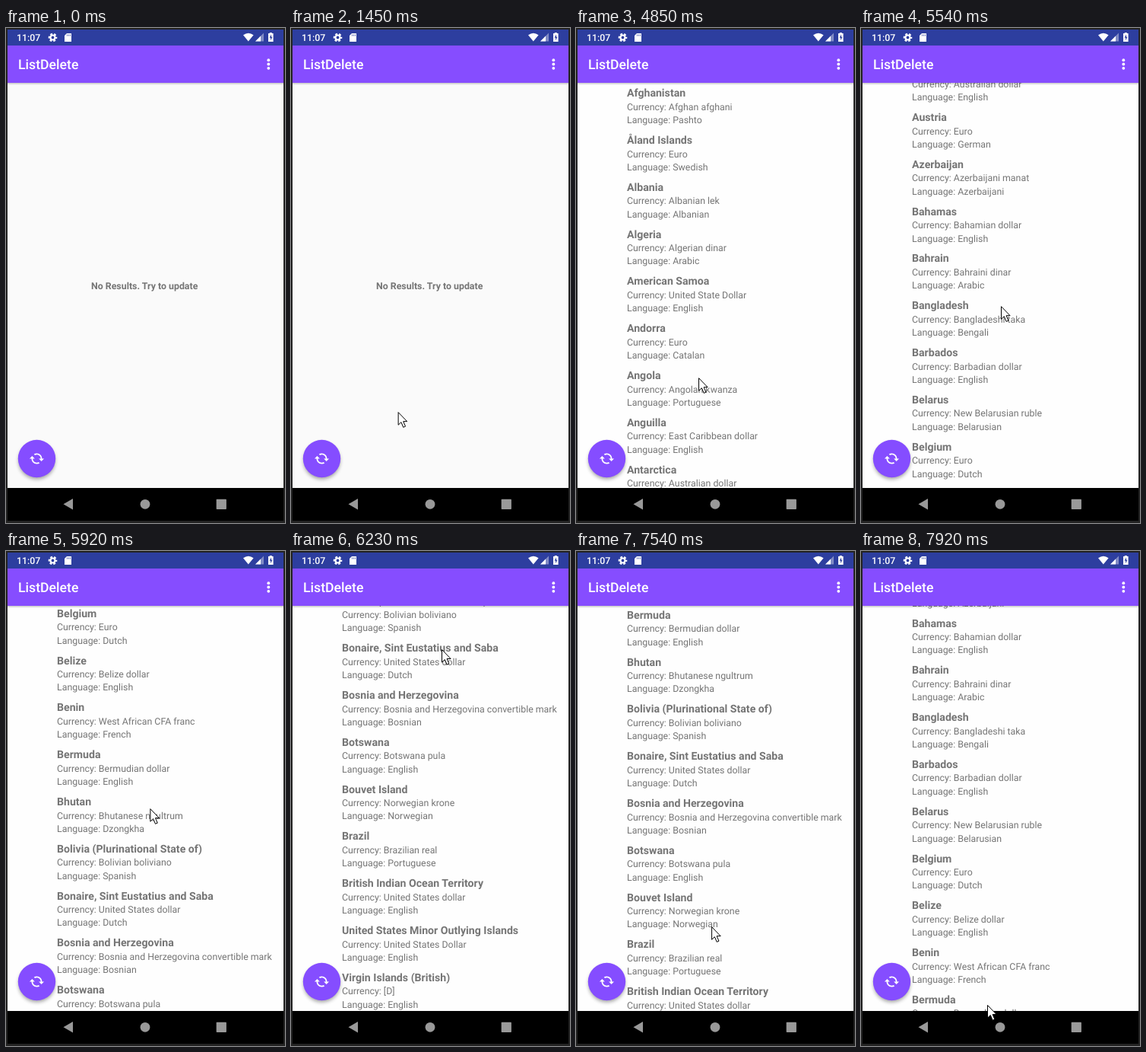
An HTML page that plays this animation: 367x650 px, repeating every 8000 ms.

```html
<!DOCTYPE html>
<html lang="en">
<head>
<meta charset="utf-8">
<style>
html, body { margin: 0; width: 100%; height: 100%; overflow: hidden; background: #232323; }
svg { display: block; font: 12.36px Roboto, sans-serif; text-rendering: geometricPrecision; }
.name { font-size: 14.13px; font-weight: 700; }
</style>
</head>
<body>
<svg width="367" height="650" viewBox="0 0 367 650">
  <defs>
    <clipPath id="screen"><rect x="2" y="72" width="363" height="532"/></clipPath>
    <clipPath id="disc"><circle cx="40.5" cy="565.5" r="24.7"/></clipPath>
    <linearGradient id="shade" x2="0" y2="1">
      <stop stop-opacity=".22"/><stop offset="1" stop-opacity="0"/>
    </linearGradient>
    <filter id="blur" x="-50%" y="-50%" width="200%" height="200%"><feGaussianBlur stdDeviation="2.5"/></filter>
  </defs>
  <rect x="2" y="72" width="363" height="532" fill="#fafafa"/>

  <g clip-path="url(#screen)" fill="#757575">
    <text id="empty" x="112" y="343" font-weight="700">No Results. Try to update</text>
    <g id="results">
      <rect x="2" y="72" width="363" height="532" fill="#fefefe"/>
      <g id="list"></g>
    </g>
    <rect x="2" y="72" width="363" height="3" fill="url(#shade)"/>
    <circle cx="40.5" cy="568.5" r="24" fill="#000" opacity=".36" filter="url(#blur)"/>
    <circle cx="40.5" cy="565.5" r="24.7" fill="#854dff"/>
    <g clip-path="url(#disc)"><circle id="ripple" fill="#000"/></g>
    <path fill="#fff" transform="translate(40.5 565.5) scale(-.87 .87) translate(-12 -12)" d="M19 8l-4 4h3c0 3.31-2.69 6-6 6-1.01 0-1.97-.25-2.8-.7l-1.46 1.46C8.97 19.54 10.43 20 12 20c4.42 0 8-3.58 8-8h3zM6 12c0-3.31 2.69-6 6-6 1.01 0 1.97.25 2.8.7l1.46-1.46C15.03 4.46 13.57 4 12 4c-4.42 0-8 3.58-8 8H1l4 4 4-4z"/>
  </g>

  <rect x="2" y="2" width="363" height="21" fill="#2d3e9f"/>
  <rect x="2" y="23" width="363" height="49" fill="#864dff"/>
  <g fill="#fff">
    <text x="14" y="17" font-weight="500">11:07</text>
    <g fill="none" stroke="#fff" stroke-width="2.2">
      <circle cx="61.5" cy="12.5" r="3"/>
      <circle cx="61.5" cy="12.5" r="4.7" stroke-dasharray="2.8 2.12" stroke-dashoffset="1.4"/>
    </g>
    <path d="M80 7h6v11h-9v-8z"/>
    <path d="M80.5 8.5v2M82.5 8.5v2M84.5 8.5v2" stroke="#2d3e9f" stroke-width=".8"/>
    <path d="M318.8 17.5L312 9.2q6.8-5 13.6 0z"/>
    <path d="M328 17.5h11v-11z" opacity=".4"/>
    <path d="M328 17.5h7v-7z"/>
    <path d="M346.8 7V6h3v1h1.8v11h-6.6V7z"/>
    <path d="M349 8.5l-2.4 4.3h1.5v3.4l2.3-4.4h-1.4z" fill="#2d3e9f"/>
    <text x="16" y="54" font-size="17.66" font-weight="500">ListDelete</text>
    <circle cx="345.3" cy="42.2" r="1.9"/><circle cx="345.3" cy="47.5" r="1.9"/><circle cx="345.3" cy="52.8" r="1.9"/>
  </g>

  <rect x="2" y="604" width="363" height="43"/>
  <g fill="#999">
    <path d="M75.5 625.3L88 618v14.6z"/>
    <circle cx="183" cy="625.3" r="6.4"/>
    <rect x="276.7" y="618.8" width="13.2" height="13.2" rx=".8"/>
  </g>
  <path id="cursor" d="M.5.5v16.6l3.8-3.6 2.8 6.7 2.8-1.2-2.8-6.5h5z" fill="#fff" stroke="#000" stroke-linejoin="round"/>
</svg>
<script>
const LOOP = 8000, ROW = 61.8, PRESS = 2620, LOADED = 3850;
const countries = `Afghanistan|Afghan afghani|Pashto
Åland Islands|Euro|Swedish
Albania|Albanian lek|Albanian
Algeria|Algerian dinar|Arabic
American Samoa|United State Dollar|English
Andorra|Euro|Catalan
Angola|Angolan kwanza|Portuguese
Anguilla|East Caribbean dollar|English
Antarctica|Australian dollar|English
Antigua and Barbuda|East Caribbean dollar|English
Argentina|Argentine peso|Spanish
Armenia|Armenian dram|Armenian
Aruba|Aruban florin|Dutch
Australia|Australian dollar|English
Austria|Euro|German
Azerbaijan|Azerbaijani manat|Azerbaijani
Bahamas|Bahamian dollar|English
Bahrain|Bahraini dinar|Arabic
Bangladesh|Bangladeshi taka|Bengali
Barbados|Barbadian dollar|English
Belarus|New Belarusian ruble|Belarusian
Belgium|Euro|Dutch
Belize|Belize dollar|English
Benin|West African CFA franc|French
Bermuda|Bermudian dollar|English
Bhutan|Bhutanese ngultrum|Dzongkha
Bolivia (Plurinational State of)|Bolivian boliviano|Spanish
Bonaire, Sint Eustatius and Saba|United States dollar|Dutch
Bosnia and Herzegovina|Bosnia and Herzegovina convertible mark|Bosnian
Botswana|Botswana pula|English
Bouvet Island|Norwegian krone|Norwegian
Brazil|Brazilian real|Portuguese
British Indian Ocean Territory|United States dollar|English
United States Minor Outlying Islands|United States Dollar|English
Virgin Islands (British)|[D]|English
Virgin Islands (U.S.)|United States dollar|English
Brunei Darussalam|Brunei dollar|Malay`.split("\n");

// [time, x, y]
const pointerPath = [
  [670, 296, 652], [980, 295, 623], [1080, 295, 623], [1300, 235, 560], [1500, 110, 486],
  [1700, 46, 505], [1920, 160, 540], [2000, 160, 540], [2300, 50, 560], [2450, 33, 557],
  [3000, 33, 557], [3390, 130, 432], [3500, 131, 435], [4220, 161, 460], [4850, 161, 460],
  [5200, 182, 190], [5300, 184, 190], [5540, 184, 365], [5800, 186, 420], [6230, 198, 129],
  [6300, 198, 129], [6690, 200, 228], [7000, 200, 228], [7150, 198, 255], [7700, 170, 590],
  [7850, 166, 605], [7920, 166, 596]
];
// [time, offset]
const scrollPath = [
  [4850, 0], [5200, 280], [5540, 832.7], [5620, 950], [5900, 1280], [6230, 1627],
  [6400, 1700], [6690, 1746.5], [7000, 1746.5], [7150, 1720], [7700, 1390], [7770, 1260], [7920, 980.3]
];

const $ = id => document.getElementById(id);
const clamp = v => Math.min(1, Math.max(0, v));

function follow(path, t) {
  const next = path.findIndex(key => key[0] > t);
  if (next < 1) return path.at(next).slice(1);
  const a = path[next - 1], b = path[next];
  const k = (t - a[0]) / (b[0] - a[0]);
  return a.slice(1).map((v, i) => v + (b[i + 1] - v) * k);
}

$("list").innerHTML = countries.map((line, i) => {
  const [name, currency, language] = line.split("|");
  return `<g transform="translate(67 ${i * ROW})"><text class="name" y="91">${name}</text>
    <text y="108.6">Currency: ${currency}</text><text y="125.9">Language: ${language}</text></g>`;
}).join("");

function render(t) {
  const [x, y] = follow(pointerPath, t);
  const [offset] = follow(scrollPath, t);
  $("cursor").setAttribute("transform", `translate(${x} ${y})`);
  $("list").setAttribute("transform", `translate(0 ${-offset})`);

  const loaded = t >= LOADED;
  $("empty").style.display = loaded ? "none" : "";
  $("results").style.display = loaded ? "" : "none";

  const spread = clamp((t - PRESS) / 320);
  const ripple = $("ripple");
  ripple.setAttribute("cx", 33 + 7.5 * spread);
  ripple.setAttribute("cy", 559 + 6.5 * spread);
  ripple.setAttribute("r", spread * 38);
  ripple.setAttribute("opacity", 0.13 * clamp((3500 - t) / 400));
}

function frame(now) {
  render(now % LOOP);
  requestAnimationFrame(frame);
}
requestAnimationFrame(frame);
</script>
</body>
</html>
```
